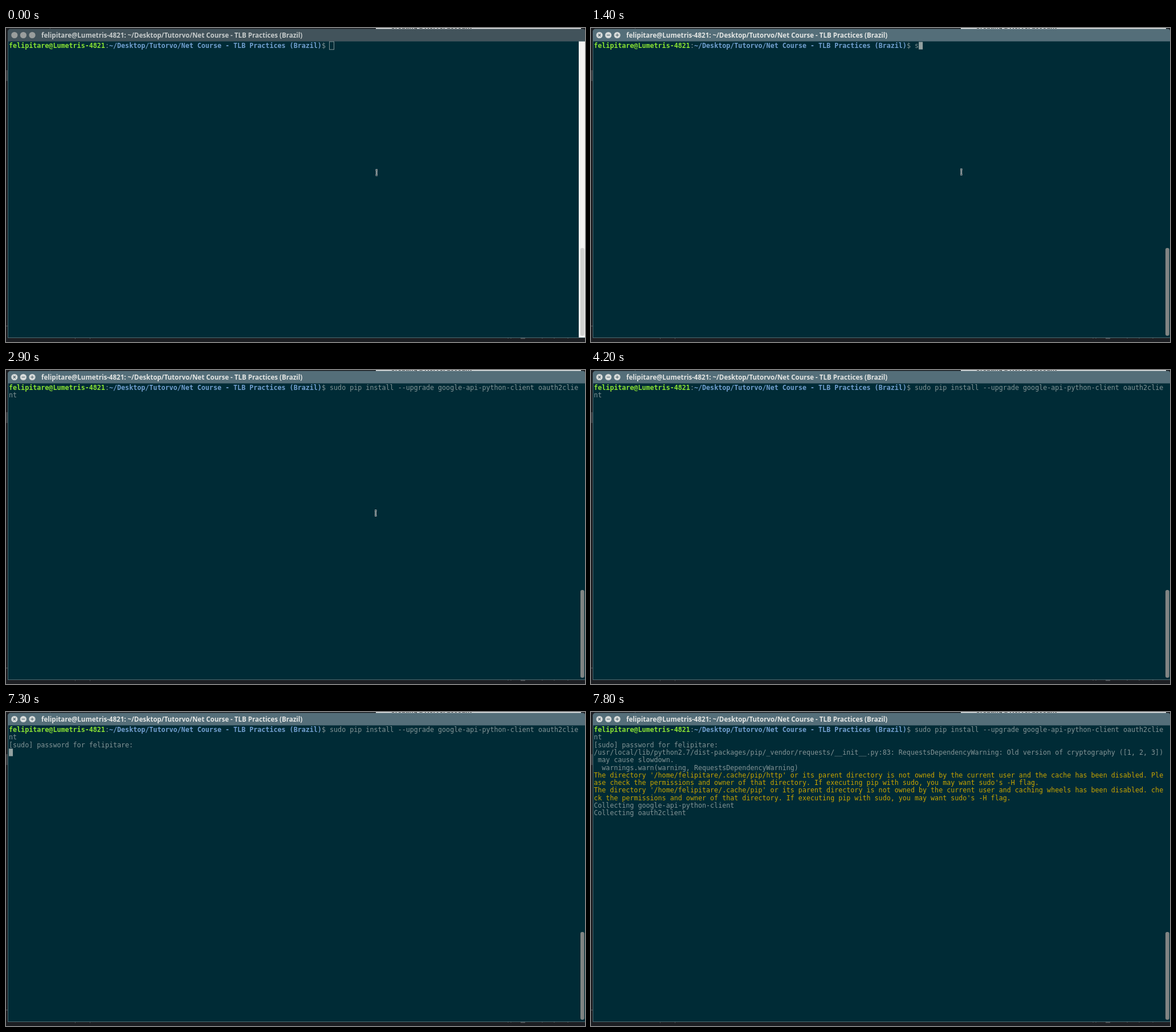
An HTML page with a canvas for the animation above (8000 ms loop, 1016x551 px).

```html
<!DOCTYPE html>
<html lang="en">
<head>
<meta charset="utf-8">
<title>Terminal session</title>
<style>
  html, body { margin: 0; width: 100%; height: 100%; overflow: hidden; background: #1c1e22; }
  canvas { display: block; }
</style>
</head>
<body>
<canvas id="stage" width="1016" height="551"></canvas>
<script>
const ctx = document.getElementById('stage').getContext('2d');
const LOOP = 8000;
const COLS = 142, LEFT = 5, TOP = 24.4, CELL_W = 7.038, CELL_H = 13.3;
const MONO = '11.69px "DejaVu Sans Mono", monospace';
const GRAY = '#839496', YELLOW = '#c8a400', GREEN = '#8ae234', BLUE = '#729fcf';

const USER = 'felipitare';
const HOST = USER + '@Lumetris-4821';
const PATH = '~/Desktop/Tutorvo/Net Course - TLB Practices (Brazil)';
const PROMPT_COLS = (HOST + ':' + PATH + '$ ').length;
const COMMAND = 'sudo pip install --upgrade google-api-python-client oauth2client';
const OWNERSHIP = ' or its parent directory is not owned by the current user and ';
const ADVICE = ' the permissions and owner of that directory. If executing pip with sudo, you may want sudo\'s -H flag.';

// Output blocks: time of appearance, first row, text, colour
const OUTPUT = [
  [4300, 2, `[sudo] password for ${USER}: `, GRAY],
  [7500, 3, '/usr/local/lib/python2.7/dist-packages/pip/_vendor/requests/__init__.py:83: ' +
    'RequestsDependencyWarning: Old version of cryptography ([1, 2, 3]) may cause slowdown.', GRAY],
  [7500, 5, '  warnings.warn(warning, RequestsDependencyWarning)', GRAY],
  [7700, 6, `The directory '/home/${USER}/.cache/pip/http'${OWNERSHIP}the cache has been disabled. Please check${ADVICE}`, YELLOW],
  [7700, 8, `The directory '/home/${USER}/.cache/pip'${OWNERSHIP}caching wheels has been disabled. check${ADVICE}`, YELLOW],
  [7700, 10, 'Collecting google-api-python-client', GRAY],
  [7800, 11, 'Collecting oauth2client', GRAY]
];

// Text cursor: start time, column, row (no column means hidden)
const CURSOR = [
  [0, PROMPT_COLS, 0], [900], [1400, PROMPT_COLS + 1, 0], [1500, PROMPT_COLS + 2, 0],
  [1600, PROMPT_COLS + 3, 0], [1700, PROMPT_COLS + 4, 0], [1800, PROMPT_COLS + 5, 0],
  [2900], [3600, 2, 1], [4200], [4300, 32, 2], [5100], [5300, 32, 2],
  [7300, 0, 3], [7500, 0, 6], [7700]
];

// Mouse pointer: start time, x, y
const POINTER = [
  [0, 650.3, 253.7], [700, 650.3, 253.4], [800, 650.1, 253.1], [1400, 649.8, 252.7],
  [1500, 649.5, 252.3], [1600, 649.2, 251.9], [1700, 649, 251.5], [1800, 648.7, 251.2],
  [3600, 648.2, 250.7], [4200]
];

const current = (steps, t) => steps.filter(step => step[0] <= t).pop();

function rect(x, y, w, h, color, radius = 0) {
  ctx.fillStyle = color;
  ctx.beginPath();
  ctx.roundRect(x, y, w, h, radius);
  ctx.fill();
}

function label(text, x, y, font, color) {
  ctx.font = font;
  ctx.fillStyle = color;
  ctx.fillText(text, x, y);
}

function print(text, col, row, color, bold = false) {
  while (text) {
    const part = text.slice(0, COLS - col);
    label(part, LEFT + col * CELL_W, TOP + 10.6 + row * CELL_H, (bold ? 'bold ' : '') + MONO, color);
    text = text.slice(part.length);
    col = 0;
    row++;
  }
}

function drawDesktop() {
  rect(0, 0, 1016, 551, '#1c1e22');
  rect(0, 74, 3, 19, '#3a3d41');
  rect(0, 522, 3, 2, '#3a3d41');
  rect(649, 0, 360, 3, '#ececec');
  label('Creating a Norvel account', 675, 0.6, 'bold 12.2px Roboto, sans-serif', '#444');
  for (const x of [77, 121, 147]) rect(x, x < 100 ? 0 : 544, 1, 2, '#45484c');
  for (const x of [880, 885, 940, 961, 985]) rect(x, 544, 2, 1, '#3c3f43');
  rect(903, 544, 8, 1.5, '#55585c');
}

function drawButton(x, sign, active) {
  const y = 12.5;
  ctx.fillStyle = active ? '#d7dbda' : '#999d9c';
  ctx.beginPath();
  ctx.arc(x, y, 5.6, 0, Math.PI * 2);
  ctx.fill();
  if (!active) return;
  const d = sign === 'x' ? 2 : 2.7;
  ctx.strokeStyle = '#4d626c';
  ctx.lineWidth = 1.1;
  ctx.beginPath();
  if (sign === 'x') {
    ctx.moveTo(x - d, y - d); ctx.lineTo(x + d, y + d);
    ctx.moveTo(x + d, y - d); ctx.lineTo(x - d, y + d);
  } else {
    ctx.moveTo(x - d, y); ctx.lineTo(x + d, y);
    if (sign === '+') { ctx.moveTo(x, y - d); ctx.lineTo(x, y + d); }
  }
  ctx.stroke();
}

function drawWindow(active) {
  const bar = active ? '#546e79' : '#42535b';
  rect(3, 1.6, 1013, 22.4, bar, [5, 4, 0, 0]);
  rect(3, 23.5, 1013, 520.5, '#4d6970');
  rect(4, 23.5, 1012, 519.5, '#002b36');
  ['x', '-', '+'].forEach((sign, i) => drawButton(14.8 + i * 15.6, sign, active));
  label(`${HOST}: ${PATH}`, 62, 16.6, 'bold 11.55px "Open Sans", sans-serif', active ? '#e4e6e4' : '#c6cbcb');
  if (!active) rect(1005, 23.5, 11, 519.5, '#f2f1f0');
  rect(1008, 386, 6.7, 154, active ? '#808483' : '#cfcfce', 3);
}

function drawCommand(t) {
  print(HOST, 0, 0, GREEN, true);
  print(':', HOST.length, 0, GRAY);
  print(PATH, HOST.length + 1, 0, BLUE, true);
  print('$', PROMPT_COLS - 2, 0, GRAY);
  const typed = t >= 2900 ? COMMAND.length : Math.max(0, Math.min(5, Math.floor(t / 100) - 13));
  print(COMMAND.slice(0, typed), PROMPT_COLS, 0, GRAY);
}

function drawCursor(t, active) {
  const [, col, row] = current(CURSOR, t);
  if (col === undefined) return;
  const x = LEFT + col * CELL_W, y = TOP + row * CELL_H;
  if (active) return rect(x, y, CELL_W, CELL_H - 0.1, '#93a1a1');
  ctx.strokeStyle = '#839496';
  ctx.lineWidth = 1;
  ctx.strokeRect(567.5, 24, 8, 13.8);
}

function drawPointer(t) {
  const [, x, y] = current(POINTER, t);
  if (x === undefined) return;
  const serif = 1.7, reach = 4.6;
  const beam = (width, color) => {
    ctx.strokeStyle = color;
    ctx.lineWidth = width;
    ctx.beginPath();
    for (const side of [-reach, reach]) {
      ctx.moveTo(x - serif, y + side);
      ctx.lineTo(x + serif, y + side);
    }
    ctx.moveTo(x, y - reach);
    ctx.lineTo(x, y + reach);
    ctx.stroke();
  };
  beam(2.6, '#e8eaea');
  beam(0.9, '#15242a');
}

function frame(now) {
  const t = now % LOOP;
  const active = t >= 300;
  drawDesktop();
  drawWindow(active);
  drawCommand(t);
  for (const [start, row, text, color] of OUTPUT) if (t >= start) print(text, 0, row, color);
  drawCursor(t, active);
  drawPointer(t);
  requestAnimationFrame(frame);
}
requestAnimationFrame(frame);
</script>
</body>
</html>
```
